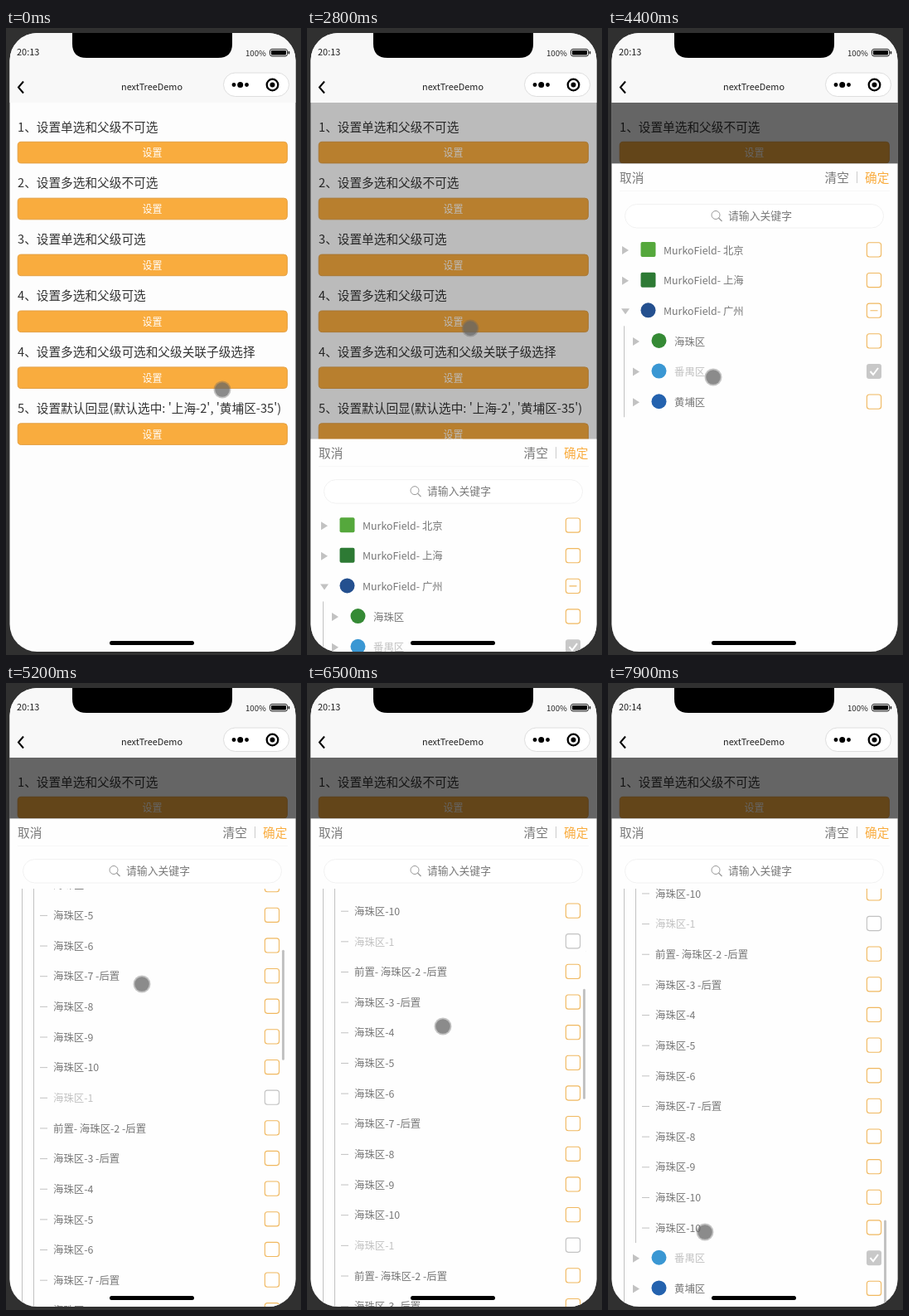
These frames come from a looping animation (356x756 px, 8 s). An HTML page:

```html
<!DOCTYPE html>
<html lang="zh-CN">
<head>
<meta charset="utf-8">
<style>
html, body { margin: 0; width: 100%; height: 100%; overflow: hidden; background: #303030; }
svg { display: block; font-family: "Noto Sans CJK SC", "Noto Sans CJK", "Noto Sans", sans-serif; }
</style>
</head>
<body>
<svg id="stage" width="356" height="756" viewBox="0 0 356 756"></svg>
<script>
const LOOP = 8000, PITCH = 36.65, CHILDREN = 51;
const ORANGE = '#f9ac3e', GREY = '#777', PALE = '#c2c2c2';
const FIRST_ROW = 268, LIST_TOP = 248, ROW_FONT = 12.4;
const CHILD_SHIFT = CHILDREN * PITCH;
const NOTCH = 93.6, SCROLL_END = 1590; // one wheel notch and the last scroll position

const text = (x, y, size, fill, content, more = '') =>
  `<text x="${x}" y="${y}" dy=".375em" font-size="${size}" fill="${fill}" ${more}>${content}</text>`;
const rect = (x, y, w, h, r, fill, more = '') =>
  `<rect x="${x}" y="${y}" width="${w}" height="${h}" rx="${r}" fill="${fill}" ${more}/>`;
const circle = (x, y, r, fill, more = '') =>
  `<circle cx="${x}" cy="${y}" r="${r}" fill="${fill}" ${more}/>`;
const path = (d, stroke, width = 1, more = '') =>
  `<path d="${d}" fill="none" stroke="${stroke}" stroke-width="${width}" ${more}/>`;
const middle = 'text-anchor="middle"';
const rowY = index => FIRST_ROW + index * PITCH;

function checkbox(rowCenter, state) {
  const y = rowCenter - 0.6;
  if (state === 'checked')
    return rect(312, y - 9, 18, 18, 3, '#c8c8c8') + path(`M316.500 ${y}l3.500 4 6-8`, '#fff', 2);
  const stroke = state === 'disabled' ? PALE : '#f0b85f';
  return rect(312.4, y - 8.6, 17.2, 17.2, 3, '#fff', `stroke="${stroke}" stroke-width="1.1"`) +
    (state === 'partial' ? path(`M316.500 ${y}h9`, stroke, 1.1) : '');
}

function branch(index, { x = 17, label, color, round, open, state }) {
  const y = rowY(index);
  const arrow = open ? `M${x - 1} ${y - 3}h10l-5 7z` : `M${x} ${y - 5}v10l8-5z`;
  const icon = round ? circle(x + 31.5, y - 1, 9, color) : rect(x + 22.5, y - 10, 18, 18, 2, color);
  return `<path d="${arrow}" fill="${PALE}"/>` + icon +
    text(x + 50, y, ROW_FONT, state === 'checked' ? PALE : GREY, label) + checkbox(y, state);
}

function leaf(n) {
  const y = rowY(3 + n), number = n === CHILDREN ? 10 : (n - 1) % 10 + 1;
  const label = (number === 2 ? '前置- ' : '') + '海珠区-' + number + ([2, 3, 7].includes(number) ? ' -后置' : '');
  const off = number === 1;
  return path(`M41 ${y}h9`, PALE) + text(57, y, ROW_FONT, off ? PALE : GREY, label) +
    checkbox(y, off ? 'disabled' : '');
}

const titles = ['1、设置单选和父级不可选', '2、设置多选和父级不可选', '3、设置单选和父级可选',
  '4、设置多选和父级可选', '4、设置多选和父级可选和父级关联子级选择',
  "5、设置默认回显(默认选中: '上海-2', '黄埔区-35')"];

const page = titles.map((title, i) => {
  const y = 119 + i * 67.9;
  return text(14, y, 14.67, '#333', title) +
    rect(14.2, y + 18.3, 325.2, 25.6, 4, ORANGE, 'stroke="#e3a045"') +
    text(176.5, y + 31.5, 12, '#fff', '设置', middle);
}).join('');

const tree =
  branch(0, { label: 'MurkoField- 北京', color: '#55a83c' }) +
  branch(1, { label: 'MurkoField- 上海', color: '#2d7a34' }) +
  branch(2, { label: 'MurkoField- 广州', color: '#24508f', round: true, open: true, state: 'partial' }) +
  path('', PALE, 1, 'id="trunk"') +
  branch(3, { x: 30, label: '海珠区', color: '#358a35', round: true }) +
  `<g id="leaves">${Array.from({ length: CHILDREN }, (_, i) => leaf(i + 1)).join('')}` +
  path(`M33.500 ${rowY(3) + 18}v${CHILD_SHIFT}`, PALE) + '</g>' +
  '<g id="after">' +
  branch(4, { x: 30, label: '番禺区', color: '#3a97d3', round: true, state: 'checked' }) +
  branch(5, { x: 30, label: '黄埔区', color: '#2462ae', round: true }) + '</g>';

const sheet = rect(4, 163.4, 346, 640, 0, '#fefefe') +
  text(14, 180, 14.67, GREY, '取消') + text(261.5, 180, 14.67, GREY, '清空') +
  path('M300.500 173v14', '#ccc') + text(310, 180, 14.67, ORANGE, '确定') +
  path('M14 196.500h326', '#f7f7f7') +
  rect(20.5, 212.5, 312, 28.5, 14.2, '#fff', 'stroke="#f1f1f1"') +
  circle(130, 225.5, 5, 'none', 'stroke="#999"') + path('M133.500 229l4 4', '#999', 1.2) +
  text(145, 226.5, 12.83, GREY, '请输入关键字') +
  `<g clip-path="url(#list)"><g id="tree">${tree}</g>${rect(333, 0, 3, 133, 1.5, PALE, 'id="thumb"')}</g>`;

const header = rect(4, 6, 346, 84, 0, '#f8f8f8') +
  '<path d="M80 6H273V19Q273 36 256 36H97Q80 36 80 19Z"/>' +
  text(13, 28.5, 11, '#222', '20:13', 'id="clock"') + text(289, 30, 9.6, '#222', '100%') +
  rect(318.5, 25.5, 21, 8.5, 2.5, 'none', 'stroke="#222"') + rect(320, 27, 18, 5.5, 1, '#000') +
  rect(340.5, 28, 1.8, 3.5, 0.8, '#222') +
  path('M21 64.500l-6 7 6 7', '#000', 2) + text(176, 70.5, 10.9, '#222', 'nextTreeDemo', middle) +
  rect(262.5, 54, 79, 28.5, 14.2, '#fff', 'stroke="#dedede"') +
  circle(275, 68.5, 2.4, '#000') + circle(282.7, 68.5, 3.5, '#000') + circle(290.5, 68.5, 2.4, '#000') +
  circle(321.5, 68.5, 6.8, 'none', 'stroke="#000" stroke-width="2.3"') + circle(321.5, 68.5, 3, '#000');

document.getElementById('stage').innerHTML =
  `<defs><clipPath id="screen">${rect(4.5, 6, 345, 746, 33, '#fff')}</clipPath>
  <clipPath id="list">${rect(4, LIST_TOP, 346, 540, 0, '#fff')}</clipPath></defs>` +
  '<g clip-path="url(#screen)">' + rect(4, 6, 346, 746, 0, '#fdfdfd') + page +
  rect(4, 90, 346, 662, 0, '#000', 'id="mask"') + `<g id="sheet">${sheet}</g>` + header +
  rect(125, 739, 102, 5, 2.5, '#000') + '</g>' +
  '<g id="cursor">' + circle(0, 0, 10.5, '#666', 'fill-opacity=".38"') +
  circle(0, 0, 8.8, '#666', 'fill-opacity=".6"') + '</g>';

const parts = Object.fromEntries(
  ['trunk', 'leaves', 'after', 'tree', 'thumb', 'mask', 'sheet', 'clock', 'cursor']
    .map(id => [id, document.getElementById(id)]));
const move = (node, x, y) => node.setAttribute('transform', `translate(${x} ${y})`);
const show = (node, on) => { node.style.display = on ? '' : 'none'; };
const smooth = u => u * u * (3 - 2 * u);

// Keys are [time, ...values]; values ease between neighbouring keys.
function track(keys, t, ease = smooth) {
  const next = keys.findIndex(key => key[0] > t);
  if (next < 0) return keys[keys.length - 1].slice(1);
  if (next === 0) return keys[0].slice(1);
  const a = keys[next - 1], b = keys[next];
  const e = ease((t - a[0]) / (b[0] - a[0]));
  return a.slice(1).map((v, i) => v + (b[i + 1] - v) * e);
}

const cursorKeys = [[700, 261, 436], [1400, 178, 345], [1600, 183, 320], [1800, 181, 301],
  [2150, 186, 444], [2500, 196, 362], [2750, 196, 362], [3000, 206, 363], [3600, 91, 361],
  [3700, 77, 371], [3850, 77, 371], [4400, 127, 421], [4700, 164, 363], [5550, 164, 363],
  [6300, 164, 414], [7350, 164, 414], [7900, 117, 662]];
// The wheel turns three notches, then two, then spins to the end of the list.
const scrollKeys = [[4750, 0], [5170, 3 * NOTCH], [5270, 3 * NOTCH], [5550, 5 * NOTCH],
  [6500, 5 * NOTCH], [7400, SCROLL_END]];

function draw(t) {
  const u = Math.min(1, Math.max(0, (t - 2740) / 350)), shown = 1 - (1 - u) ** 3;
  const expanded = t >= 4700, shift = expanded ? CHILD_SHIFT : 0;
  const [scroll] = track(scrollKeys, t, v => v);
  parts.mask.setAttribute('opacity', 0.6 * shown);
  move(parts.sheet, 0, 590 * (1 - shown));
  show(parts.sheet, shown);
  show(parts.leaves, expanded);
  move(parts.after, 0, shift);
  parts.trunk.setAttribute('d', `M19.500 ${rowY(2) + 18}v${3 * PITCH + shift}`);
  move(parts.tree, 0, -scroll);
  parts.thumb.setAttribute('y', 252 + scroll / 4.02);
  show(parts.thumb, scroll);
  parts.clock.textContent = t < 7500 ? '20:13' : '20:14';
  move(parts.cursor, ...track(cursorKeys, t));
}

const start = performance.now();
function frame() {
  draw((performance.now() - start) % LOOP);
  requestAnimationFrame(frame);
}
frame();
</script>
</body>
</html>
```
